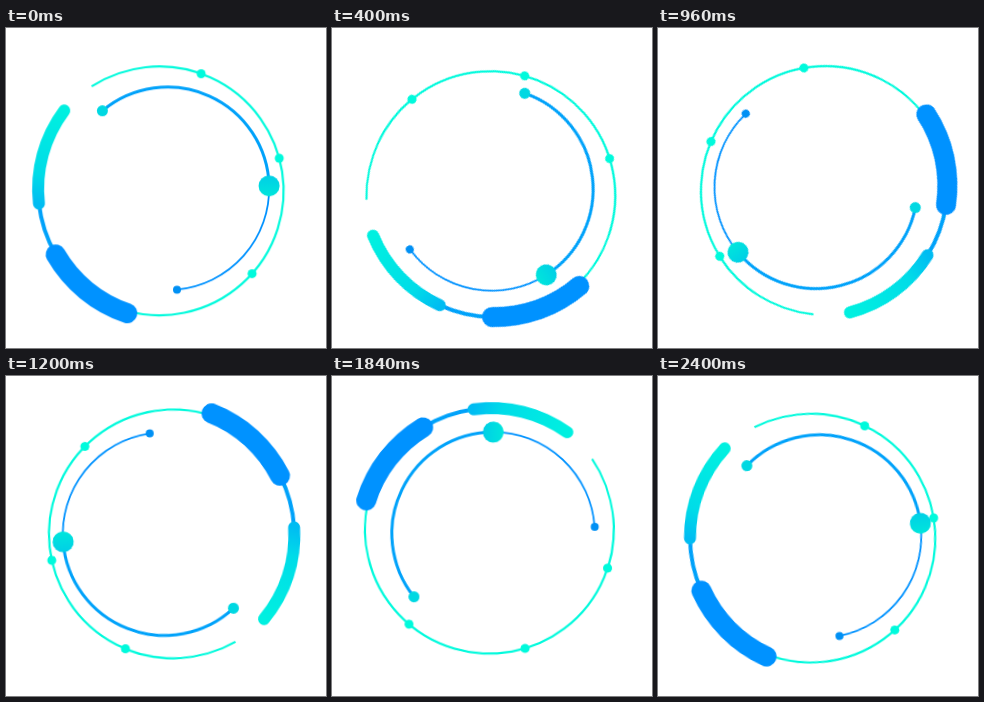
Recreate the animation shown at these times as an HTML page. Size 320 by 320 pixels, loop 2440 ms.

```html
<!DOCTYPE html>
<html lang="en">
<head>
<meta charset="utf-8">
<title>Rotating rings</title>
<style>
  html, body { margin: 0; width: 100%; height: 100%; overflow: hidden; background: #fff; }
  svg { display: block; width: 100%; height: 100%; }
  path { fill: none; }
</style>
</head>
<body>
<svg viewBox="0 0 320 320">
  <defs>
    <linearGradient id="tail" gradientUnits="userSpaceOnUse" x1="-127" y1="16" x2="-102" y2="-77">
      <stop offset="0" stop-color="#00bcf2"/>
      <stop offset=".3" stop-color="#00dce8"/>
      <stop offset="1" stop-color="#00f0e0"/>
    </linearGradient>
    <linearGradient id="bead" x1="0" y1="0" x2="0" y2="1">
      <stop offset="0" stop-color="#00cfe6"/>
      <stop offset="1" stop-color="#00e6dc"/>
    </linearGradient>
  </defs>
  <g transform="translate(160.2 160.2)"><g id="outer"></g></g>
  <g transform="translate(160 159.2)"><g id="inner"></g></g>
</svg>
<script>
const LOOP = 2440, STEPS = 61;
const MINT = '#00fadc', BLUE = '#0092ff', SKY = '#00a2fa';
const outer = document.getElementById('outer');
const inner = document.getElementById('inner');

const polar = (r, deg) => {
  const a = deg * Math.PI / 180;
  return [r * Math.cos(a), r * Math.sin(a)];
};

function add(parent, tag, attrs) {
  const el = document.createElementNS('http://www.w3.org/2000/svg', tag);
  for (const key in attrs) el.setAttribute(key, attrs[key]);
  parent.append(el);
}

// A circle whose centre sits slightly off the pivot.
function ring(parent, r, offset, direction) {
  const [cx, cy] = polar(offset, direction);
  const at = deg => {
    const [x, y] = polar(r, deg);
    return [cx + x, cy + y];
  };
  return {
    arc(from, to, stroke, width, cap = 'butt') {
      const large = to - from > 180 ? 1 : 0;
      add(parent, 'path', {
        d: `M${at(from)} A${r} ${r} 0 ${large} 1 ${at(to)}`,
        stroke, 'stroke-width': width, 'stroke-linecap': cap
      });
    },
    dot(deg, size, fill) {
      const [x, y] = at(deg);
      add(parent, 'circle', { cx: x, cy: y, r: size, fill });
    }
  };
}

const thin = ring(outer, 124.4, 7.5, 159.5);
thin.arc(-122.9, 105, MINT, 2.2);
for (const deg of [-70.3, -15.2, 41.7]) thin.dot(deg, 4.5, MINT);

const bars = ring(outer, 131, 3, 15);
bars.arc(150, 173.6, SKY, 4);
bars.arc(108.6, 150, BLUE, 20, 'round');
bars.arc(173.6, 216.8, 'url(#tail)', 12, 'round');

const beads = ring(inner, 101.5, 2.1, 39);
beads.arc(-130, -1.5, SKY, 3);
beads.arc(-1.5, 84.7, BLUE, 1.8);
beads.dot(-130, 5.5, '#00d8e2');
beads.dot(-1.5, 10.5, 'url(#bead)');
beads.dot(84.7, 4, '#0090f4');

function spin(el, turn) {
  el.animate(
    { transform: ['rotate(0deg)', `rotate(${turn}deg)`] },
    { duration: LOOP, iterations: Infinity, easing: `steps(${STEPS})`, delay: -1 }
  );
}
spin(outer, -360);
spin(inner, 360);
</script>
</body>
</html>
```
